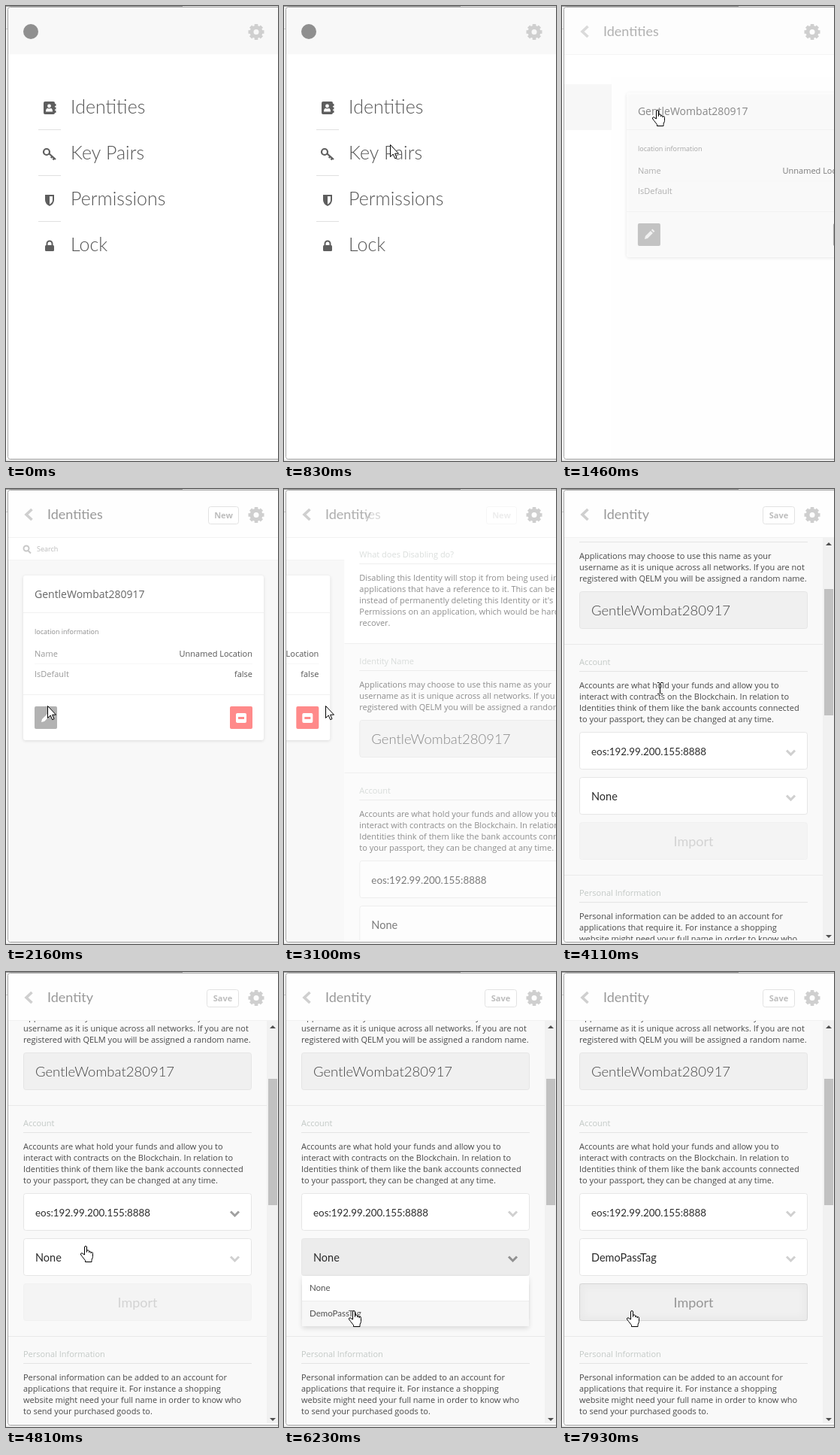
Animation of 362 by 605 pixels, one loop 8 s. Source, as an HTML page with a canvas:

```html
<!DOCTYPE html>
<html lang="en">
<head>
<meta charset="utf-8">
<title>Identity setup</title>
<style>
html, body { margin: 0; width: 100%; height: 100%; overflow: hidden; background: #fff; }
canvas { display: block; }
</style>
</head>
<body>
<canvas id="stage" width="362" height="605"></canvas>
<script>
const c = document.getElementById('stage').getContext('2d');
const LOOP = 8000, STEP = 78.06, PAGE = 359;
const BODY = '"Open Sans", sans-serif', HEAD = 'Lato, sans-serif';
const USER = 'GentleWombat280917', KEY = 'DemoPassTag', HOST = 'eos:192.99.200.155:8888';

const seg = (t, a, b) => Math.min(1, Math.max(0, (t - a) / (b - a)));
const easeOut = p => 1 - (1 - p) ** 3;
const smooth = p => p * p * (3 - 2 * p);
const mix = (a, b, p) => a + (b - a) * p;
const gray = v => `rgb(${v},${v},${v})`;

function text(s, x, y, font, color, align = 'left') {
  c.font = font;
  c.fillStyle = color;
  c.textAlign = align;
  c.fillText(s, x, y);
}
function rect(x, y, w, h, color) {
  c.fillStyle = color;
  c.fillRect(x, y, w, h);
}
function box(x, y, w, h, r, fill, border) {
  c.beginPath();
  c.roundRect(x, y, w, h, r);
  if (fill) { c.fillStyle = fill; c.fill(); }
  if (border) { c.strokeStyle = border; c.lineWidth = 1; c.stroke(); }
}
function disc(x, y, r, color) {
  c.beginPath();
  c.arc(x, y, r, 0, 7);
  c.fillStyle = color;
  c.fill();
}
function path(d, fill, stroke, width = 1) {
  const p = new Path2D(d);
  if (fill) { c.fillStyle = fill; c.fill(p); }
  if (stroke) { c.strokeStyle = stroke; c.lineWidth = width; c.stroke(p); }
}
// Draws shifted by (x, y) with an opacity
function group(x, y, alpha, fn) {
  if (alpha <= 0) return;
  c.save();
  c.translate(x, y);
  c.globalAlpha *= alpha;
  fn();
  c.restore();
}

// ---- Menu page ----
const ICONS = [
  color => {
    box(-8, -9, 15, 17, 2, color);
    for (const y of [-6, -1.5, 3]) rect(7, y, 1.5, 3, color);
    disc(-.5, -3, 2.4, '#fff');
    path('M-5 4.5q0-4.5 2.5-4.5q2 1 4 0q2.5 0 2.5 4.5z', '#fff');
  },
  color => {
    path('M-1 -1L8 7M3.5 3L1.8 5M6 5.5L4.5 7.5', null, color, 2.2);
    path('M-8 -3a4 4 0 1 0 8 0a4 4 0 1 0 -8 0', null, color, 2.2);
  },
  color => {
    path('M-6 -7H6V0Q6 5 0 8Q-6 5 -6 0z', color);
    path('M0 -5H4V0Q4 3.5 0 5.7z', '#fff');
  },
  color => {
    box(-6, -1, 12, 8, 1.5, color);
    path('M-3.5 0V-3a3.5 3.5 0 0 1 7 0V0', null, color, 2);
  }
];

function menu(hover) {
  if (hover) rect(3, 104, PAGE, 61, '#f7f7f7');
  ['Identities', 'Key Pairs', 'Permissions', 'Lock'].forEach((label, i) => {
    const y = 136 + 61 * i, on = hover && !i;
    group(58, y, 1, () => ICONS[i](on ? '#444' : '#5e5e5e'));
    text(label, 86, y + 7, '300 25px ' + HEAD, on ? '#333' : '#555');
    if (i < 3) rect(43, y + 28, 30, 1, '#e0e0e0');
  });
}

// ---- Identity list page ----
function list(t) {
  const late = seg(t, 1480, 2130), press = seg(t, 2200, 2470);
  rect(3, 95, PAGE, 507, gray(mix(254, 248, late)));
  group(0, 0, late, () => {
    rect(3, 94, PAGE, 1, '#f3f3f3');
    path('M23.5 79a3.5 3.5 0 1 0 7 0a3.5 3.5 0 1 0 -7 0M29.5 82L33 85.5', null, '#c8c8c8', 2);
    text('Search', 41, 83, '9px ' + BODY, '#bbb');
  });

  c.save();
  c.shadowColor = 'rgba(0,0,0,.12)';
  c.shadowBlur = 4;
  c.shadowOffsetY = 1;
  box(23, 115, 320, 219, 3, '#fff');
  c.restore();
  text(USER, 38, 145, '14px ' + BODY, '#666');
  for (const y of [164, 273]) rect(23, y, 320, 1, '#f1f1f1');
  rect(38, 232, 290, 1, '#f7f7f7');
  text('location information', 38, 193, '9px ' + BODY, '#8c8c8c');
  [['Name', 'Unnamed Location', 223], ['IsDefault', 'false', 250]].forEach(([k, v, y]) => {
    text(k, 38, y, '11px ' + BODY, '#999');
    text(v, 328, y, '11px ' + BODY, '#555', 'right');
  });

  box(38, 289, 30, 30, 2, gray(mix(178, 140, press)));
  path('M47 310l1-4l7-7l3 3l-7 7zM56 298l1.5-1.5l3 3l-1.5 1.5z', '#fff');
  box(298, 289, 30, 30, 2, `rgb(${mix(150, 255, late)},${mix(150, 138, late)},${mix(150, 138, late)})`);
  box(306, 298, 14, 13, 2, '#fff');
  rect(309, 303, 8, 3, '#ff8a8a');
}

// ---- Identity edit page ----
const SECTIONS = [
  [87, 'What does Disabling do?', [
    'Disabling this Identity will stop it from being used in',
    'applications that have a reference to it. This can be used',
    "instead of permanently deleting this Identity or it's",
    'Permissions on an application, which would be harder to',
    'recover.']],
  [229, 'Identity Name', [
    'Applications may choose to use this name as your',
    'username as it is unique across all networks. If you are not',
    'registered with QELM you will be assigned a random name.']],
  [401, 'Account', [
    'Accounts are what hold your funds and allow you to',
    'interact with contracts on the Blockchain. In relation to',
    'Identities think of them like the bank accounts connected',
    'to your passport, they can be changed at any time.']],
  [708, 'Personal Information', [
    'Personal information can be added to an account for',
    'applications that require it. For instance a shopping',
    'website might need your full name in order to know who',
    'to send your purchased goods to.']]
];

function select(y, label, size, bg, arrow) {
  box(23.5, y + .5, 303, 49, 3, gray(bg), '#e6e6e6');
  text(label, 39, y + 31, size + 'px ' + HEAD, '#2b2b2b');
  path(`M299 ${y + 24.5}l5.5 5.5l5.5-5.5`, null, gray(arrow), 3);
}

function importButton(t) {
  const ready = seg(t, 7320, 7460), hover = seg(t, 7790, 7930);
  box(23.5, 614.5, 303, 49, 3, gray(mix(244, 240, hover)), gray(mix(241, 218, hover)));
  group(0, 0, hover, () => {
    c.beginPath();
    c.roundRect(23, 614, 304, 50, 3);
    c.clip();
    c.shadowColor = 'rgba(0,0,0,.3)';
    c.shadowBlur = 12;
    box(22.5, 613.5, 305, 51, 3, null, '#ccc');
  });
  text('Import', 175, 646, '18px ' + HEAD, gray(mix(211, 150, ready)), 'center');
}

function dropdown(t, cursorY) {
  const alpha = seg(t, 5150, 5370) - seg(t, 6780, 7000);
  group(0, 0, alpha, () => {
    c.save();
    c.shadowColor = 'rgba(0,0,0,.12)';
    c.shadowBlur = 6;
    c.shadowOffsetY = 3;
    box(24, 604, 302, 67, [0, 0, 3, 3], '#fff');
    c.restore();
    ['None', KEY].forEach((label, i) => {
      const y = 604 + 34 * i;
      if (cursorY >= y - 200 && cursorY < y - 166) rect(24, y, 302, 33, '#f7f7f7');
      text(label, 34, y + 20, '11.5px ' + HEAD, '#505050');
    });
    rect(24, 637, 302, 1, '#ececec');
  });
}

function scrollbar(scroll) {
  rect(347, 65, 15, 535, '#f1f1f1');
  rect(349, 80 + scroll * .31, 12, 168, '#c1c1c1');
  path('M351 75l4-4l4 4z', scroll ? '#505050' : '#a3a3a3');
  path('M351 593l4 4l4-4z', '#505050');
}

function edit(t, cursorY) {
  const scroll = 200 * smooth(seg(t, 3895, 4195));
  c.save();
  c.beginPath();
  c.rect(3, 65, 344, 535);
  c.clip();
  c.translate(0, -scroll);
  rect(3, 65, 344, 140, '#fff');
  rect(3, 205, 344, 700, '#f9f9f9');
  for (const y of [205, 377, 684]) rect(3, y, 344, 1, '#e9e9e9');
  for (const [y, title, lines] of SECTIONS) {
    text(title, 23, y + 4, '11px ' + BODY, '#c3c9c6');
    rect(23, y + 12, 304, 1, '#e4e4e4');
    lines.forEach((s, i) => text(s, 23, y + 35 + 15 * i, '11px ' + BODY, '#484848'));
  }
  box(23.5, 307.5, 303, 49, 3, '#f0f0f0', '#e5e5e5');
  text(USER, 39, 339, '300 18.5px ' + HEAD, '#444');

  const hostHover = seg(t, 4480, 4640) - seg(t, 4830, 5130);
  const active = seg(t, 4830, 5130);
  select(494, HOST, 13.4, 255, mix(208, 160, hostHover));
  select(554, t < 6850 ? 'None' : KEY, 14.5,
    mix(255, 236, active - seg(t, 6780, 7000)),
    mix(208, 145, active - seg(t, 7320, 7460)));
  importButton(t);
  dropdown(t, cursorY);
  c.restore();
  scrollbar(scroll);
}

// ---- Header ----
function gear(x, y) {
  group(x, y, 1, () => {
    c.beginPath();
    c.arc(0, 0, 6, 0, 7);
    c.strokeStyle = '#cfcfcf';
    c.lineWidth = 5;
    c.stroke();
    for (let i = 0; i < 8; i++) {
      rect(-2.3, -10.5, 4.6, 4, '#cfcfcf');
      c.rotate(Math.PI / 4);
    }
  });
}

function headButton(label, x, w, alpha) {
  group(0, 0, alpha, () => {
    box(x + .5, 23.5, w, 23, 3, '#fff', '#e2e2e2');
    text(label, x + .5 + w / 2, 39, 'bold 11px ' + BODY, '#bdbdbd', 'center');
  });
}

function header(t, inList, inEdit) {
  rect(3, 2, PAGE, 62, gray(mix(248, 254, inList)));
  rect(3, 64, PAGE, 1, gray(mix(254, 242, inList)));
  group(0, 0, 1 - 1.5 * inList, () => disc(33, 34, 10, '#8f8f8f'));
  group(0, 0, inList, () => path('M34.5 27l-7.5 7l7.5 7', null, '#cfcfcf', 3.6));
  const title = (s, alpha) => group(0, 0, alpha, () => text(s, 55, 40, '18px ' + HEAD, '#999'));
  title('Identities', inList - inEdit);
  title('Identity', inEdit);
  headButton('New', 269, 40, seg(t, 1480, 2130) - seg(t, 3000, 3150));
  headButton('Save', 267, 42, seg(t, 3150, 3700));
  gear(333, 34.5);
}

// ---- Cursor ----
const MOVES = [
  [290, 259, 547], [990, 126, 138], [1530, 126, 138], [2150, 55, 288],
  [3150, 55, 288], [3790, 130, 265], [4290, 130, 265], [4825, 105, 364],
  [5120, 102, 376], [5620, 102, 376], [6215, 92, 450]
];
const SHAPES = [
  [275, 'arrow'], [1220, 'hand'], [1530, 'arrow'], [2240, 'hand'],
  [3100, 'arrow'], [3500, 'beam'], [4480, 'hand']
];
const CURSORS = {
  arrow: () => path('M.5 .5V16.5L4.2 13L6.7 18.7L9 17.7L6.6 12.2H11.5z', '#fff', '#000'),
  hand: () => path('M-.5 12V2a1.5 1.5 0 0 1 3 0V8.5V7a1.5 1.3 0 0 1 3 .5V9V8.5a1.4 1.3 0 0 1 2.7 .5V10V9.5' +
    'a1.2 1.2 0 0 1 2.3 .8V14.5c0 2-1.5 3-1.5 5V21.5H.5V19.5L-3.5 14.5L-5.3 12a1.4 1.4 0 0 1 2.3-1.6z', '#fff', '#000'),
  beam: () => path('M-3 -7.5H-.5M1.5 -7.5H4M.5 -7V7M-3 7.5H-.5M1.5 7.5H4', null, '#000')
};

function cursorAt(t) {
  let i = MOVES.findIndex(m => m[0] > t);
  if (i < 0) i = MOVES.length;
  const a = MOVES[Math.max(0, i - 1)], b = MOVES[Math.min(i, MOVES.length - 1)];
  const p = a === b ? 0 : smooth(seg(t, a[0], b[0]));
  const shape = SHAPES.filter(s => s[0] <= t).pop();
  return {
    x: Math.round(mix(a[1], b[1], p)),
    y: Math.round(mix(a[2], b[2], p)),
    shape: shape && shape[1]
  };
}

// ---- Window ----
function windowFrame() {
  rect(0, 0, 3, 30, '#f1f1f1');
  rect(0, 30, 3, 1, '#ccc');
  rect(0, 0, 235, 1, '#999');
  rect(235, 0, 127, 1, '#ddd');
  rect(0, 603, 362, 2, '#e9e9e9');
  box(2.5, 1.5, 380, 601, 3, null, '#a6a6a6');
}

function draw(t) {
  const toList = easeOut(seg(t, 1350, 1620)), toEdit = easeOut(seg(t, 3000, 3270));
  const inList = seg(t, 1300, 1520), inEdit = seg(t, 2960, 3200);
  const cur = cursorAt(t);
  rect(0, 0, 362, 605, '#fff');
  c.save();
  c.beginPath();
  c.rect(3, 2, PAGE, 600);
  c.clip();
  if (toList < 1) group(-PAGE * toList, 0, 1, () => menu(cur.shape && cur.y < 165));
  if (toEdit < 1) group(PAGE * (1 - toList - toEdit), 0, inList, () => list(t));
  if (toEdit > 0) group(PAGE * (1 - toEdit), 0, inEdit, () => edit(t, cur.y));
  header(t, inList, inEdit);
  c.restore();
  windowFrame();
  if (cur.shape) group(cur.x, cur.y, 1, CURSORS[cur.shape]);
}

const start = performance.now();
function tick() {
  const t = (performance.now() - start) % LOOP;
  // The screen refreshes in even steps
  draw(298 + STEP * Math.floor((t - 275) / STEP));
  requestAnimationFrame(tick);
}
tick();
</script>
</body>
</html>
```
